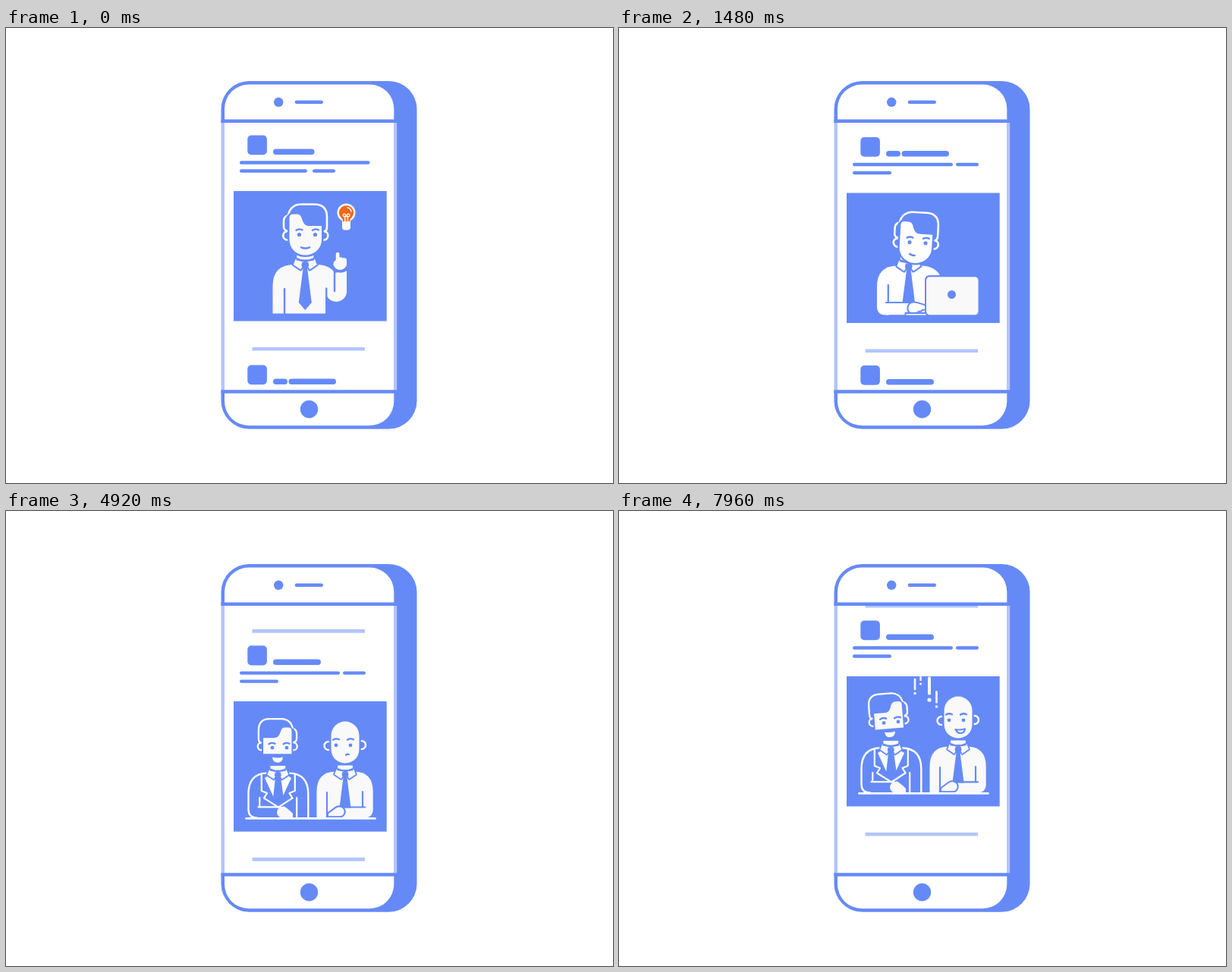
These frames come from a looping animation (800x600 px, 8 s). An HTML page with a canvas:

```html
<!DOCTYPE html>
<html lang="en">
<head>
<meta charset="utf-8">
<title>Phone feed</title>
<style>
html, body { margin: 0; width: 100%; height: 100%; overflow: hidden; background: #fff; }
canvas { display: block; width: 800px; height: 600px; }
</style>
</head>
<body>
<canvas id="stage" width="800" height="600"></canvas>
<script>
const ctx = document.getElementById('stage').getContext('2d');
const BLUE = '#658af8', PALE = '#b3c5fc', WHITE = '#fff', SOFT = '#f9f9f9', ORANGE = '#f96816';
const LOOP = 8000, STEP = 40;

const clamp = v => Math.max(0, Math.min(1, v));
const span = (t, a, b) => clamp((t - a) / (b - a));
const smooth = p => p * p * (3 - 2 * p);
const easeOut = p => 1 - (1 - p) ** 3;
const mix = (a, b, k) => a + (b - a) * k;

function fill(d, color) {
  ctx.fillStyle = color;
  ctx.fill(new Path2D(d));
}
function stroke(d, color, w = 2.2, cap = 'round') {
  ctx.strokeStyle = color;
  ctx.lineWidth = w;
  ctx.lineCap = cap;
  ctx.lineJoin = 'round';
  ctx.stroke(new Path2D(d));
}
function disc(x, y, r, color) {
  ctx.fillStyle = color;
  ctx.beginPath();
  ctx.arc(x, y, r, 0, 7);
  ctx.fill();
}
function box(x, y, w, h, color, r = 0) {
  ctx.fillStyle = color;
  ctx.beginPath();
  ctx.roundRect(x, y, w, h, r);
  ctx.fill();
}
function bar(x1, x2, y, w, color = BLUE) {
  box(x1, y - w / 2, x2 - x1, w, color, w / 2);
}
function at(x, y, angle, scale, draw) {
  ctx.save();
  ctx.translate(x, y);
  ctx.rotate(angle * Math.PI / 180);
  ctx.scale(scale, scale);
  draw();
  ctx.restore();
}

// Hair and face around the middle of the head.
function hair() {
  const d = 'M-24 -1Q-28.5 -2 -28.5 -7V-14Q-28.5 -20 -22.5 -21.5' +
    'C-21 -31 -14 -36 -6 -36H12Q28.5 -36 28.5 -19V-6Q28.5 -2 26 0';
  const ears = 'M-23.5 -.5A5.6 5.6 0 0 0 -23.5 11M25 -.5A5.8 5.8 0 0 1 24.5 11';
  fill(d, BLUE);
  stroke(d, WHITE, 2.6);
  stroke('M-23 -20V-4', BLUE, 3);
  stroke(ears, WHITE, 2.6);
}
const FRINGE = 'M-21 -18Q-21 -23 -16 -23H-11C-5 -23 -5 -17 -3 -13C-1 -9 1 -7.5 6 -7.5H21.5';

function eyes(x1, x2, y, r = 2.6) {
  for (const x of [x1, x2]) disc(x, y, r, BLUE);
}
function brows(x1, x2, y) {
  for (const x of [x1, x2]) stroke(`M${x - 4} ${y + .8}Q${x} ${y - 1.6} ${x + 4} ${y + .4}`, BLUE, 2.4);
}
function youngHead(color, mouth) {
  hair();
  const face = FRINGE + 'V10C21.5 24 10 31 0 31C-10 31 -21 24 -21 10Z';
  stroke(face, BLUE, 5);
  fill(face, color);
  eyes(-8, 13, 4);
  brows(-8, 13.5, -2.6);
  stroke(mouth, BLUE, 2.5);
}

// Neck, tie and collar; the origin is the tie knot.
function neckwear(color, tie = true) {
  box(-11, -14, 22, 6.5, color);
  if (tie) fill('M-4.5 -4H4.5L2.8 4L8.5 49L0 59L-8.5 49L-2.8 4Z', BLUE);
  for (const s of [-1, 1]) {
    ctx.save();
    ctx.scale(s, 1);
    const d = 'M12.5 -8.5L15.5 -1L6 5.5L.5 -4Z';
    stroke(d, BLUE, 4);
    fill(d, color);
    ctx.restore();
  }
  stroke('M-11 -7.5Q0 -5 11 -7.5', BLUE, 2);
  fill('M-4 -4.5H4L5 0L2.5 5H-2.5L-5 0Z', BLUE);
}

function idea() {
  fill('M351.5 376.5V340Q351.5 312 380 312H409C421 312 429 316 433 323L449 320V345A13.2 13.2 0 0 1 421.5 349V376.5Z', SOFT);
  stroke('M367 344V376M422.2 343.5V377', BLUE, 2.4);
  stroke('M433 320V347', BLUE, 2.4);
  const hand = 'M434.8 306V297.5A2.4 2.4 0 0 1 439.4 297.5V302.5Q442 301.5 443.5 303.5Q445 302 446.5 303.5Q449 303 449 306V312A9 9 0 0 1 431.5 312Q431 308 434.8 306Z';
  stroke(hand, BLUE, 4);
  fill(hand, SOFT);
  stroke('M431.5 317.5Q440 325 449.5 318.5', BLUE, 2.2);
  at(394.3, 313, 0, 1, () => neckwear(SOFT));
  at(394.5, 268.5, 0, 1, () => youngHead(SOFT, 'M-5.5 20.8Q0 23 5.5 20.8'));

  disc(448.5, 243.5, 12, WHITE);
  box(443, 251, 11, 15.5, WHITE, 4);
  disc(448.5, 243.5, 9.6, ORANGE);
  fill('M443 250H454L453 255H444Z', ORANGE);
  stroke('M450 236.7Q454.5 238 455 242', WHITE, 1.5);
  stroke('M446.8 255V248.5A1.8 1.8 0 1 0 445 248.5H452A1.8 1.8 0 1 0 450.3 248.5V255', WHITE, 1.3);
}

function typist(t) {
  const lean = smooth(span(t, 1090, 1760)) - smooth(span(t, 3930, 4460));
  const lift = smooth(span(t, 1930, 2700)) - smooth(span(t, 2780, 3390));
  const tap = t < 1940 ? .8 + .2 * Math.cos((t - 720) / 320 * 2 * Math.PI) : 1 - span(t, 3000, 3390);

  fill('M340 367V341Q340 313.5 367 313.5H398C411 313.5 420 319 424 328V378.5H351.5Q340 378.5 340 367Z', WHITE);
  at(381.8, 315, 0, 1, () => neckwear(WHITE));
  stroke('M354.8 339V361', BLUE, 2.3);

  at(352, 370, -18 * lift, 1, () => {
    fill('M0 -8H36V8.5H1Z', WHITE);
    stroke('M0 -8H32M4 9.3H42', BLUE, 2.2);
    at(37, -1, 18 * lift, 1, () => {
      const top = mix(4, -7, tap), tip = mix(7, .5, tap), pad = mix(7, 3.5, tap);
      const d = `M-5 7.5C-11 3 -9.5 -7.5 0 -7.5Q3 -7.5 16 ${top}V${tip}L11 ${tip}L9 ${pad}H6Q5 7.5 0 7.5Z`;
      fill(d, WHITE);
      stroke(d, BLUE, 2.1);
    });
  });
  box(376.5, 374.8, 30, 4.2, BLUE, 1);
  box(378.5, 377, 28, 1.6, WHITE);

  box(403, 326, 72, 54, BLUE, 6);
  box(405, 328.3, 68.5, 50, SOFT, 4.5);
  disc(438.5, 351.5, 5.5, BLUE);

  const mouth = `M-7 ${mix(20, 19, lean)}Q${mix(-2, -5, lean)} ${mix(22.8, 20.6, lean)} ${mix(4, -3, lean)} 21`;
  at(382 + 14.9 * lean, 270.3 + 14 * lean, 5.4 * lean, 1, () => youngHead(WHITE, mouth));
}

function beardedMan(t) {
  stroke('M344 312.5C328 313 319.5 322 319.5 340V360Q319.5 371.5 331 371.5M373 312.5C390 313 398.3 322 398.3 340V371.5', WHITE, 2.4);
  fill('M341 319L358.5 357L376 319L366 313H351Z', WHITE);
  fill('M355 318H362L366.5 350L359 360L351.5 350Z', BLUE);
  stroke('M336.8 315.5V336L344 339L340 345.5L359 357.5L377.5 345.5L373.5 339L380.8 336V315.5', WHITE, 2.2);
  stroke('M334.3 345V357M383.2 345V371M332.5 357.2H362', WHITE, 2.2);
  fill('M366 356.5Q369 357 378 366V371.5H362Q357 369 357 364Q358 357 366 356.5Z', SOFT);
  at(358.3, 315.5, 0, .9, () => neckwear(SOFT, false));

  const tilt = smooth(span(t, 5770, 6420));
  const talk = t > 6400 && t < 7290 ? .8 + .2 * Math.cos((t - 6400) / 296 * 2 * Math.PI) : 1;
  at(358 - 2.5 * tilt, 272.7 - .3 * tilt, -4.6 * tilt, 1, () => {
    ctx.save();
    ctx.scale(-.88, .88);
    hair();
    const face = FRINGE + 'V16.5H-21Z';
    stroke(face, BLUE, 4);
    fill(face, SOFT);
    ctx.restore();
    eyes(-7, 12, 6.4, 2.4);
    brows(-7.5, 11.5, .6);
    const low = 18.5 + 9.5 * talk;
    fill(`M-7 18.8Q0 20.5 7 18.8Q6 ${low - 1.5} 0 ${low - 2.2}Q-6 ${low - 1.5} -7 18.8Z`, WHITE);
  });
}

function baldMan(t) {
  fill('M409.5 371.5V337Q409.5 310.5 435 310.5H458Q483.7 310.5 483.7 337V360Q483.7 371.5 472 371.5Z', SOFT);
  at(447, 315, 0, .9, () => neckwear(SOFT));
  fill('M424 358.4H473V371.3H424Z', SOFT);
  stroke('M423 338V371M470 337V357M444 357.4H473', BLUE, 2.2);
  const hand = 'M424 370.3V365.5L434 358Q438 355 443 357.2Q447.5 360 446.5 365Q445 370.3 440 370.3Z';
  fill(hand, SOFT);
  stroke(hand, BLUE, 2.1);

  const grow = 1.5 + 4.5 * span(t, 5800, 7300);
  const sway = t < 5500 ? 0 : -grow * Math.sin((t - 5500) / 1230 * 2 * Math.PI);
  const smile = smooth(span(t, 5420, 5600));
  at(447, 303 + Math.abs(sway) * .3, sway, 1, () => {
    stroke('M-22 -32A5.2 5.2 0 0 0 -22 -21M21.5 -33A5.2 5.2 0 0 1 21.5 -22', WHITE, 2.4);
    const face = 'M-18.5 -40A18.5 18.5 0 0 1 18.5 -40V-22C18.5 -10 9 -3.5 0 -3.5C-9 -3.5 -18.5 -10 -18.5 -22Z';
    stroke(face, BLUE, 4);
    fill(face, SOFT);
    eyes(-12, 7, -27.2, 2.4);
    brows(-12, 7, -35.2);
    if (smile < .3) return stroke('M1 -14.2Q3 -16 5 -15', BLUE, 2.2);
    at(2.5, -14.5, 0, smile, () => {
      const d = 'M-6 -.5Q1 1 6.5 -1.2Q6 4 1 4.4Q-4 4.4 -6 -.5Z';
      fill(d, WHITE);
      stroke(d, BLUE, 2);
    });
  });
}

// x, size, birth time
const MARKS = [
  [408, .75, 5523], [415.5, 1, 5710], [391, .65, 5900], [419, .7, 6040], [399, .6, 6190],
  [409, 1, 6340], [417, .7, 6500], [392, .65, 6640], [401, .75, 6790], [411, 1, 6930],
  [419, .65, 7080], [393, .7, 7220], [397.5, .6, 7372], [390, .65, 7529], [409, 1, 7635], [418.5, .68, 7748]
];
function marks(t) {
  for (const [x, size, birth] of MARKS) {
    const age = t - birth;
    if (age < 0 || age > 1200) continue;
    const s = size * clamp(age / 50);
    at(x, 275 - .08 * age, 0, s, () => {
      disc(0, 0, 2.6, SOFT);
      bar(0, 0, 0, 0);
      box(-2, -30.5, 4, 24, SOFT, 1.5);
    });
  }
}

function meeting(t) {
  beardedMan(t);
  baldMan(t);
  stroke('M316.5 372.3H486.5', WHITE, 2.7);
  marks(t);
}

// Each scene is drawn around its own resting image top.
const POSTS = [
  { y: 215, rest: 215, title: [[352, 406.5]], lines: [[308, 479.5, 0], [308, 397, 1], [404, 434, 1]], scene: idea },
  { y: 518, rest: 217.5, title: [[352, 371], [372.5, 435]], lines: [[308, 440, 0], [444, 474, 0], [308, 359, 1]], scene: typist },
  { y: 819, rest: 218, title: [[352, 415]], lines: [[308, 440, 0], [444, 474, 0], [308, 359, 1]], scene: meeting }
];

function post({ y, rest, title, lines, scene }, t) {
  box(318.3, y - 73.5, 25.6, 25.8, BLUE, 5);
  for (const [a, b] of title) bar(a, b, y - 51.8, 7.6);
  for (const [a, b, row] of lines) bar(a, b, y - 37.5 + row * 11, 4.4);
  box(324.5, y + 206, 148.5, 4.6, PALE);
  box(300, y, 201.7, 171.6, BLUE);
  ctx.save();
  ctx.beginPath();
  ctx.rect(300, y, 201.7, 171.6);
  ctx.clip();
  ctx.translate(0, y - rest);
  scene(t);
  ctx.restore();
}

function phone() {
  box(283.5, 70, 258, 458.7, BLUE, 37);
  box(288, 74.5, 223.3, 449.8, WHITE, 32);
  disc(359.2, 97.8, 6.2, BLUE);
  bar(380.7, 418, 97.7, 4.6);
  disc(399.5, 502.8, 11.7, BLUE);
  box(283, 125, 232, 352.5, WHITE);
  box(283.5, 125, 4.5, 352.5, PALE);
  box(511, 125, 4.2, 352.5, PALE);
  box(283.5, 120.5, 231.5, 4.5, BLUE);
  box(283.5, 477.3, 231.5, 4.5, BLUE);
}

function draw(t) {
  ctx.fillStyle = WHITE;
  ctx.fillRect(0, 0, 800, 600);
  phone();
  const scroll = 300.5 * (easeOut(span(t, 240, 1085)) + easeOut(span(t, 4480, 5325)));
  ctx.save();
  ctx.beginPath();
  ctx.rect(288, 125, 223, 352.3);
  ctx.clip();
  for (const p of POSTS) {
    const y = p.y - scroll;
    if (y > -90 && y < 560) post({ ...p, y }, t);
  }
  ctx.restore();
}

const start = performance.now();
function tick() {
  const t = (performance.now() - start) % LOOP;
  draw(Math.floor(t / STEP) * STEP);
  requestAnimationFrame(tick);
}
tick();
</script>
</body>
</html>
```
